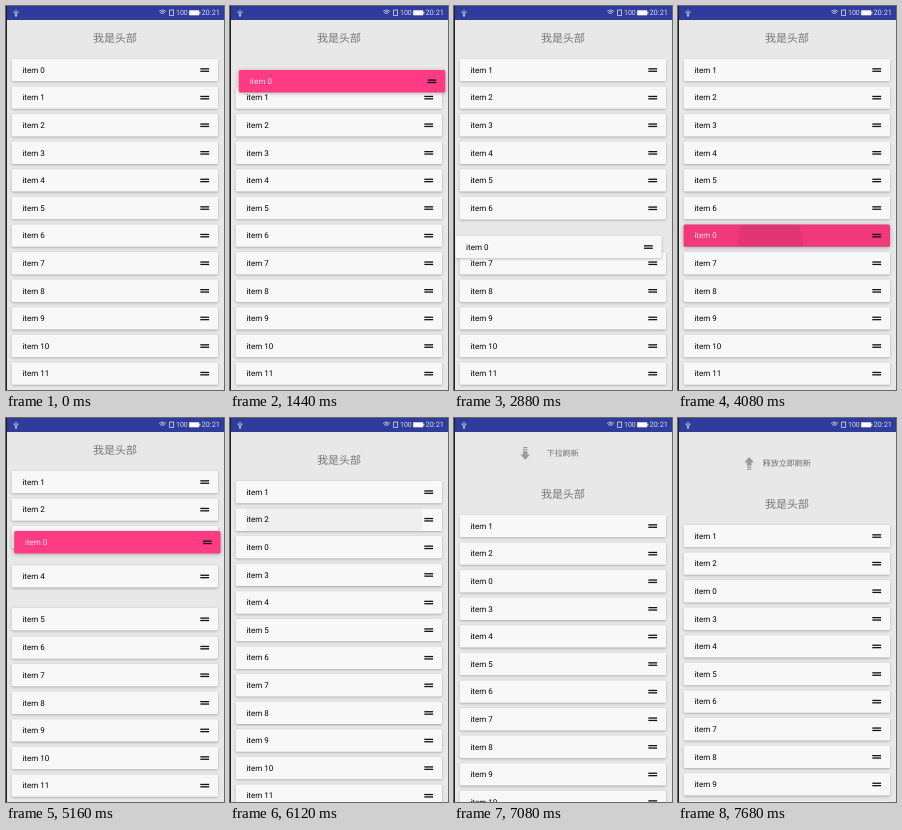
An HTML page with a canvas for the animation above (8000 ms loop, 218 px wide and 384 px high).

```html
<!DOCTYPE html>
<html lang="zh">
<head>
<meta charset="utf-8">
<style>
html, body { margin: 0; width: 100%; height: 100%; overflow: hidden; background: #e8e8e8; }
canvas { display: block; width: 218px; height: 384px; }
</style>
</head>
<body>
<canvas id="stage"></canvas>
<script>
const W = 218, H = 384, LOOP = 8000, STEP = 120, LAST = 7680;
const ROW = 27.6, FIRST = 64, BAR = 14;
const SHIFT = 470, FLIP = 7200;
const LATIN = 'Roboto, sans-serif';
const HAN = '"Noto Sans CJK SC", "Noto Sans CJK", sans-serif';
const canvas = document.getElementById('stage');
const c = canvas.getContext('2d');
const dpr = window.devicePixelRatio || 1;
canvas.width = W * dpr;
canvas.height = H * dpr;
c.textRendering = 'geometricPrecision';

// Each drag: finger down, grab, move from "from" by "by" px, drop, settle on a slot
const down = { press: 240, grab: 720, start: 1200, span: 1480, from: 0, by: 177,
  drop: 2880, settle: 360, slot: 6, sway: 4.5 };
const up = { press: 3480, grab: 4080, start: 4080, span: 1380, from: 6 * ROW, by: -118.6,
  drop: 5500, settle: 200, slot: 2, sway: -3.6 };

const clamp = v => Math.min(1, Math.max(0, v));
const ease = v => (1 - Math.cos(Math.PI * clamp(v))) / 2;
const within = (t, a, b) => t >= a && t < b;

// Place of the dragged row
function place(d, t) {
  const f = clamp((t - d.start) / d.span);
  const rest = ease((t - d.drop) / d.settle);
  const y = d.from + d.by * ease(f);
  return {
    x: d.sway * Math.sin(1.6 * Math.PI * f) * (1 - rest),
    y: y + (d.slot * ROW - y) * rest
  };
}

// How far a neighbour has moved since the dragged row passed height y
function madeWay(d, y, t) {
  const v = (y - d.from) / d.by;
  if (v < 0 || v > 1) return 0;
  const passed = d.start + d.span * Math.acos(1 - 2 * v) / Math.PI;
  return ease((t - passed) / SHIFT);
}

function pullAt(t) {
  const f = clamp((t - 5915) / (LAST - 5915));
  return 54 * f * (1 + 0.69 * (1 - f));
}

function text(str, x, y, size, color, family, align = 'left') {
  c.font = `${size}px ${family}`;
  c.fillStyle = color;
  c.textAlign = align;
  c.fillText(str, x, y);
}

function rect(x, y, w, h, color) {
  c.fillStyle = color;
  c.fillRect(x, y, w, h);
}

function disc(x, y, r, color) {
  c.fillStyle = color;
  c.beginPath();
  c.arc(x, y, r, 0, 7);
  c.fill();
}

// Card centred on y; ripple: {x, dy, r, veil, alpha}
function card(label, x, y, pink, ripple) {
  c.save();
  c.translate(x, y);
  c.beginPath();
  c.roundRect(5.6, -11.2, 206.4, 22.4, 1.5);
  c.save();
  c.shadowColor = 'rgba(0,0,0,.3)';
  c.shadowBlur = (pink ? 4 : 2.5) * dpr;
  c.shadowOffsetY = 0.8 * dpr;
  c.fillStyle = pink ? '#ff3b83' : '#f8f8f8';
  c.fill();
  c.restore();
  if (ripple) {
    c.save();
    c.clip();
    rect(0, -12, W, 24, `rgba(0,0,0,${ripple.veil})`);
    disc(ripple.x, ripple.dy, ripple.r, `rgba(0,0,0,${ripple.alpha})`);
    c.restore();
  }
  text(label, 16.4, 2.8, 8, pink ? '#ffe4ee' : '#000', LATIN);
  for (const top of [-1.8, 0.6]) rect(194.3, top, 8.8, 1.3, '#111');
  c.restore();
}

function dragRipple(d, t) {
  if (within(t, d.press, d.grab)) return { x: 85, dy: 5, r: 2, veil: 0, alpha: 0.04 };
  const a = 0.06 * (1 - (t - d.grab) / STEP);
  return within(t, d.grab, d.grab + STEP) && { x: 92.5, dy: 5, r: 32.5, veil: a, alpha: a };
}

function pullRipple(t) {
  return within(t, 6000, 6240) &&
    { x: 104, dy: 0, r: 88 * clamp((t - 5880) / 240), veil: 0, alpha: 0.035 };
}

function refreshRow(t, pull) {
  const y = pull - 8.6;
  c.save();
  c.translate(71.2, y);
  c.rotate(-Math.PI * ease((t - FLIP) / 300));
  rect(-2.2, -6.4, 4.4, 1.2, '#999');
  rect(-2.2, -4.3, 4.4, 1.2, '#999');
  rect(-2.2, -2.2, 4.4, 3.4, '#999');
  c.beginPath();
  c.moveTo(-4.8, 1);
  c.lineTo(4.8, 1);
  c.lineTo(0, 6.4);
  c.fill();
  c.restore();
  text(t < FLIP ? '下拉刷新' : '释放立即刷新', 108.8, y + 3, 8, '#6c6c6c', HAN, 'center');
}

function statusBar() {
  const ink = '#d5d9f0';
  rect(0, 0, W, BAR, '#2f3c9c');
  c.strokeStyle = ink;
  c.lineWidth = 0.8;
  c.beginPath();
  c.moveTo(10, 3.5);
  c.lineTo(10, 10);
  c.moveTo(8, 5.2);
  c.lineTo(8, 6.8);
  c.lineTo(10, 8.4);
  c.lineTo(12, 6.8);
  c.lineTo(12, 5.2);
  c.stroke();
  disc(10, 9.8, 0.9, ink);
  for (const r of [1.9, 3.4, 4.9]) {
    c.beginPath();
    c.arc(156.5, 9, r, -Math.PI * 0.75, -Math.PI * 0.25);
    c.stroke();
  }
  c.strokeRect(163.6, 4, 4, 5.4);
  text('100', 169.9, 9.3, 7.1, ink, LATIN);
  rect(183.2, 4.3, 10, 5, '#fff');
  rect(193.2, 5.8, 1.2, 2, ink);
  text('20:21', 195.4, 9.4, 7.5, ink, LATIN);
}

function draw(t) {
  c.setTransform(dpr, 0, 0, dpr, 0, 0);
  rect(0, 0, W, H, '#e8e8e8');
  const pull = pullAt(t);
  refreshRow(t, pull);
  text('我是头部', 109, 36.4 + pull, 11, '#777', HAN, 'center');
  for (let i = 1; i < 12; i++) {
    const slot = i - madeWay(down, i * ROW, t) + (i <= down.slot && madeWay(up, (i - 1) * ROW, t));
    card('item ' + i, 0, FIRST + slot * ROW + pull, false, i === 2 && pullRipple(t));
  }
  const d = t < up.press ? down : up;
  const { x, y } = place(d, t);
  card('item 0', x, FIRST + y + pull, within(t, d.grab, d.drop), dragRipple(d, t));
  statusBar();
  rect(0, 0, 1, H, '#1c1c1c');
}

function tick(now) {
  const t = now % LOOP;
  draw(Math.min(LAST, Math.floor(t / STEP) * STEP));
  requestAnimationFrame(tick);
}
requestAnimationFrame(tick);
</script>
</body>
</html>
```
